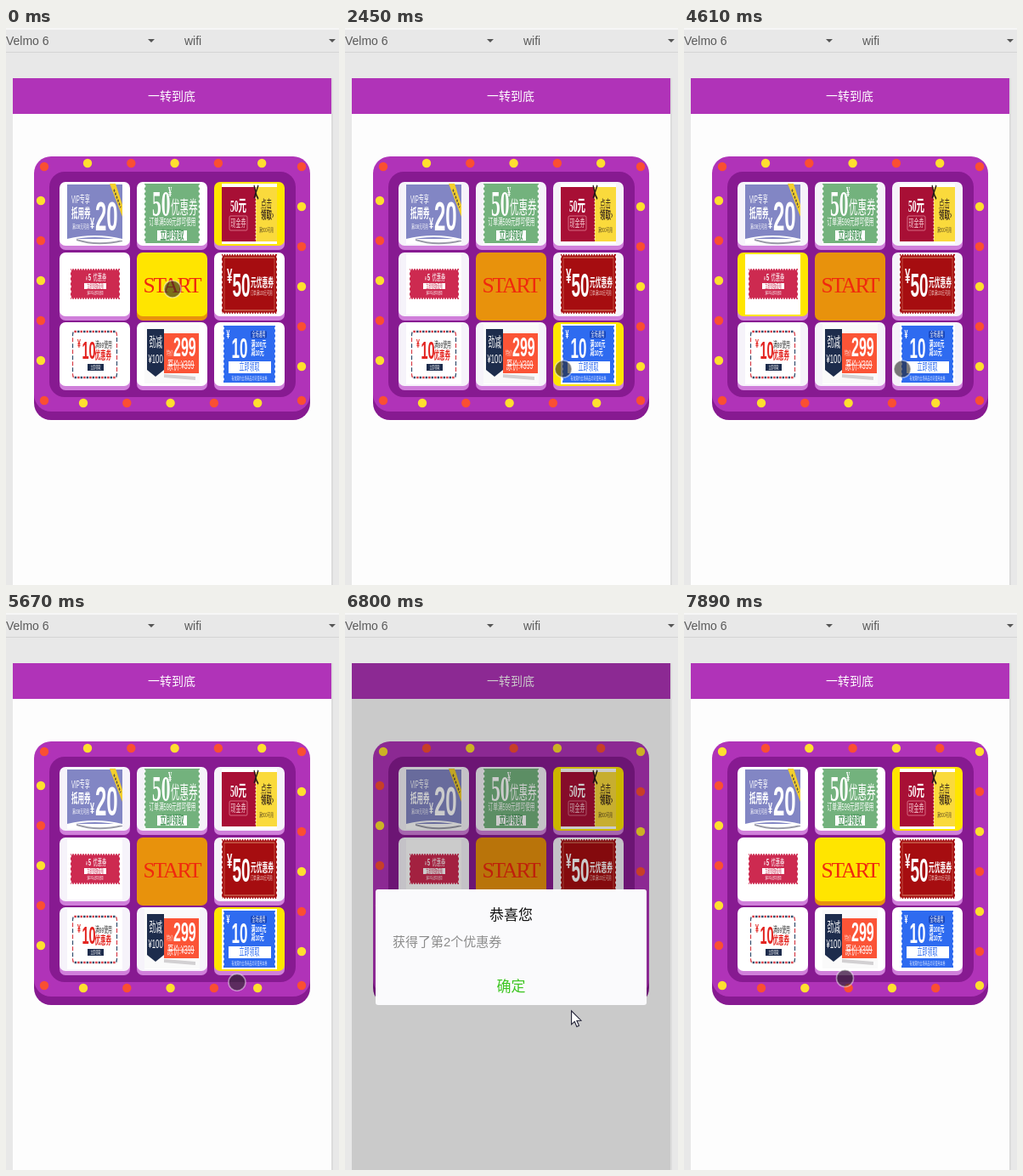
These frames come from a looping animation (392x655 px, 8 s). An HTML page:

```html
<!DOCTYPE html>
<html lang="zh-CN">
<head>
<meta charset="utf-8">
<title>一转到底</title>
<style>
html, body { margin: 0; width: 100%; height: 100%; overflow: hidden; background: #e8e8e8; }
svg { display: block; width: 100vw; height: 100vh; }
text { font-family: "Liberation Sans", "Noto Sans CJK SC", "Noto Sans CJK", sans-serif; white-space: pre; }
.serif { font-family: "Liberation Serif", "Noto Sans CJK SC", serif; }
</style>
</head>
<body>
<svg id="stage" viewBox="0 0 392 655"></svg>
<script>
const LOOP = 8000;
const START_AT = 97, TICK = 195.5, TICKS = 34;
const LAMP_AT = 65, LAMP_STEP = 475;
const OPEN_AT = START_AT + TICK * TICKS, CLOSE_AT = 7600;
const PURPLE = '#b033b8', DEEP = '#871a91', YELLOW = '#ffe500', ORANGE = '#e8920c';

const rect = (x, y, w, h, fill, r = 0, more = '') =>
  `<rect x="${x}" y="${y}" width="${w}" height="${h}" rx="${r}" fill="${fill}" ${more}/>`;
const text = (x, y, size, str, fill, more = '') =>
  `<text x="${x}" y="${y}" font-size="${size}" fill="${fill}" ${more}>${str}</text>`;
const poly = (points, fill, more = '') => `<polygon points="${points}" fill="${fill}" ${more}/>`;
const line = (d, stroke, width, more = '') =>
  `<path d="${d}" fill="none" stroke="${stroke}" stroke-width="${width}" ${more}/>`;
const bold = 'font-weight="700"', mid = 'text-anchor="middle"';
const serif = 'class="serif"';
const notches = d => line(d, '#fff', 3.5, 'stroke-linecap="round" stroke-dasharray="0 6"');

// Coupon pictures, 130 x 71 units, shown at half width like the squeezed images they are.
const coupons = [
  rect(0, 1, 130, 64, '#8286c4') +
    line('M22 66Q70 74 130 67', '#9a9aa8', 2) +
    line('M0 66Q65 58 130 66', '#fff', 2) +
    poly('100,0 114,0 130,25 130,39', '#f3cf2c') +
    line('M110 7L126 28', '#5d5440', 3, 'stroke-dasharray="3 2"') +
    text(10, 23, 12, 'VIP专享', '#fff') +
    text(10, 40, 15, '抵用券', '#fff', bold) +
    text(12, 53, 7, '满198元可用', '#fff') +
    text(54, 53, 18, '¥', '#fff', bold) +
    text(66, 55, 48, '20', '#fff', bold),
  rect(0, 0, 130, 70, '#73b27d') + notches('M1 3V70M129 3V70') +
    text(18, 38, 43, '50', '#fff', serif + bold) +
    text(56, 15, 17, '¥', '#fff', serif + bold) +
    text(62, 35, 21, '优惠券', '#fff') +
    text(11, 49, 11.4, '订单满599元即可使用', '#fff') +
    rect(30, 55, 70, 12, '#fff') + text(65, 65.5, 14, '立即领取', '#4f9b60', mid + bold),
  rect(0, 4, 80, 64, '#a80f35') + rect(80, 4, 50, 64, '#fada3c') +
    line('M80 4V68', '#fff', 1, 'stroke-dasharray="2 2"') +
    line('M76 2L82 14M86 2L78 14M76 17L80 12L86 18', '#221a1a', 2.5) +
    text(20, 33, 19, '50元', '#fff', serif + bold) +
    rect(18, 38, 42, 17, 'none', 2, 'stroke="#e58a9c"') +
    text(39, 51, 12, '现金券', '#f6c9d0', mid) +
    text(92, 28, 13, '点击', '#3b2a1c') +
    text(92, 41, 13, '领取›', '#3b2a1c', bold) +
    text(88, 57, 7.2, '满500可用', '#5d4a22'),
  rect(8, 17, 116, 36, '#cd2a50') + notches('M8 20V53M124 20V53M11 17H122M11 53H122') +
    text(44, 31, 7, '¥', '#fff') + text(50, 31, 11, '5', '#fff', bold) +
    text(61, 31, 10.5, '优惠券', '#fff') +
    rect(40, 34, 52, 7, '#fff') + text(66, 40, 6.5, '立即领取使用', '#cd2a50', mid) +
    text(66, 47, 5, '满100元即可使用', '#fff', mid),
  rect(0, 0, 130, 70, '#a60d10') + notches('M0 3V70M130 3V70M4 0H128M4 70H128') +
    rect(6, 4, 118, 62, 'none', 0, 'stroke="#d98b6a" stroke-width="1"') +
    text(12, 34, 23, '¥', '#fff', bold) +
    text(25, 50, 38, '50', '#fff', bold) +
    text(68, 38, 13.5, '元优惠券', '#fff', bold) +
    text(68, 48, 6.7, '订单满100元可用', '#f4d7d0'),
  rect(13, 9, 104, 54, '#fff', 4, 'stroke="#d8404a" stroke-width="2.5" stroke-dasharray="5 9"') +
    rect(13, 9, 104, 54, 'none', 4, 'stroke="#34506e" stroke-width="2.5" stroke-dasharray="5 9" stroke-dashoffset="-7"') +
    text(24, 28, 14, '¥', '#e32420', bold) +
    text(35, 41, 29, '10', '#e32420', bold) +
    text(66, 28, 9.7, '满99使用', '#333') +
    text(65, 41, 13, '优惠券', '#e32420', bold) +
    rect(48, 47, 38, 8, '#1d2c4c') + text(67, 53.5, 6, '立即领取', '#fff', mid),
  rect(0, 1, 130, 69, '#fafafa') +
    line('M46 61L120 64', '#d2d0d2', 4) +
    rect(46, 11, 82, 47, '#fb5436') +
    poly('6,6 46,6 46,54 26,62 6,54', '#1d2c4c') +
    text(11, 27, 15.5, '劲减', '#fff') +
    text(9, 46, 15.5, '¥100', '#fff') +
    text(52, 37, 8, '特价', '#ffd9cf') +
    text(68, 38, 32, '299', '#fff', bold) +
    text(54, 53, 14, '原价:¥399', '#fff') + line('M54 48.5H118', '#fff', 1),
  rect(4, 2, 122, 67, '#2e6bf0') + notches('M4 5V68M126 5V68') +
    text(11, 17, 14, '¥', '#fff', bold) +
    text(23, 40, 34, '10', '#fff', bold) +
    rect(68, 8, 38, 9, '#1746bd', 3) + text(87, 15.5, 8, '全场通用', '#fff', mid) +
    text(69, 27, 9.8, '满100元', '#fff', bold) +
    text(69, 37, 9.8, '减10元', '#fff', bold) +
    rect(16, 44, 100, 14, '#fff') + text(65, 55.5, 12, '立即领取', '#2e6bf0', mid) +
    text(65, 66, 6, '有效期内全场商品均可使用本券', '#dbe6ff', mid)
];
// Pictures above are listed row by row; the light runs clockwise.
const ring = [0, 1, 2, 4, 7, 6, 5, 3];

const cell = (x, y, art) =>
  rect(x, y + 5, 83, 75, '#d07fda', 7) + rect(x, y, 83, 75, '#fff', 7, 'class="face"') +
  `<g transform="translate(${x + 9} ${y + 2}) scale(.5 1)">${rect(0, 0, 130, 71, '#fff') + art}</g>`;

function cells() {
  let out = '';
  coupons.forEach((art, i) => {
    const slot = i < 4 ? i : i + 1;
    out += cell(63 + 91 * (slot % 3), [181, 264, 346][Math.floor(slot / 3)], art);
  });
  return out;
}

function lamps() {
  const spots = [];
  const add = (x, y, odd) => spots.push([x, y, odd]);
  for (const x of [45, 348]) for (const y of [163, 438]) add(x, y, 0);
  for (let i = 0; i < 5; i++) {
    const odd = (i + 1) % 2;
    add(96 + i * 51.3, 159, odd);
    add(91 + i * 51.3, 441, odd);
    add(41, 203 + i * 47, odd);
    add(348, 210 + i * 47, odd);
  }
  return spots.map(([x, y, odd]) => `<circle class="lamp" data-odd="${odd}" cx="${x}" cy="${y}" r="5.2"/>`).join('');
}

const stage = document.getElementById('stage');
stage.innerHTML =
  rect(0, 0, 392, 655, '#e8e8e8') + rect(0, 0, 392, 2, '#f6f6f6') + rect(0, 28, 392, 1, '#d4d4d4') +
  text(0, 20, 14, 'Velmo 6', '#5a5a5a') + text(210, 20, 14, 'wifi', '#5a5a5a') +
  poly('167,13 175,13 171,17', '#555') + poly('380,13 388,13 384,17', '#555') +
  rect(383, 59, 2, 596, '#dcdcdc') + rect(8, 59, 375, 596, '#fdfdfd') + rect(8, 59, 375, 42, PURPLE) +
  text(195, 85, 14, '一转到底', '#fff', mid) +
  rect(33, 161, 325, 300, DEEP, 20) + rect(33, 151, 325, 300, PURPLE, 20) +
  rect(51, 169, 290, 265, DEEP, 18) + lamps() + cells() +
  rect(154, 269, 83, 75, ORANGE, 7) + rect(154, 264, 83, 75, YELLOW, 7, 'id="go"') +
  text(195, 311, 25.5, 'START', '#f0280e', mid + ' letter-spacing="-2" ' + serif) +
  `<g id="modal">${rect(8, 59, 375, 596, '#000', 0, 'opacity=".205"') +
    rect(36, 325, 319, 136, '#fafafc', 3) +
    text(195.5, 361, 17, '恭喜您', '#111', mid) +
    text(56, 392, 15, '获得了第2个优惠券', '#8c8c8c') +
    text(195.5, 445, 17, '确定', '#3cc51f', mid)}</g>` +
  '<circle id="touch" r="10" fill="#282828" fill-opacity=".62" stroke="#fff" stroke-opacity=".45" stroke-width="1.6"/>' +
  poly('0,0 0,16 3.7,12.6 6.3,18.6 8.9,17.5 6.3,11.6 11.3,11.4', '#fff', 'id="arrow" stroke="#222236" stroke-width="1.1"');

const $ = id => document.getElementById(id);
const go = $('go'), modal = $('modal'), touch = $('touch'), arrow = $('arrow');
const faces = [...stage.querySelectorAll('.face')];
const lampEls = [...stage.querySelectorAll('.lamp')];

const path = [
  [0, 196, 307], [430, 196, 307], [1190, 214, 363], [1640, 257, 401], [5300, 257, 401],
  [5670, 272, 434], [5830, 267, 467], [7000, 266.5, 468], [7400, 190, 434], [7800, 189.5, 429.5], [LOOP, 189.5, 429.5]
];
const clamp = v => Math.max(0, Math.min(1, v));

function pointer(t) {
  const i = Math.max(1, path.findIndex(p => p[0] > t));
  const a = path[i - 1], b = path[i];
  const k = (t - a[0]) / (b[0] - a[0]);
  return [a[1] + (b[1] - a[1]) * k, a[2] + (b[2] - a[2]) * k];
}

function draw(t) {
  const running = t >= START_AT && t < CLOSE_AT;
  const tick = Math.min(TICKS, Math.floor((t - START_AT) / TICK));
  const lit = ring[tick < 1 ? TICKS % 8 : tick % 8];
  faces.forEach((f, i) => f.setAttribute('fill', i === lit ? YELLOW : running ? '#f6f3fa' : '#fff'));
  go.setAttribute('fill', running ? ORANGE : YELLOW);

  const swap = Math.floor((t - LAMP_AT) / LAMP_STEP) + 1;
  lampEls.forEach(l => l.setAttribute('fill', (swap + +l.dataset.odd) % 2 ? '#ffdf2f' : '#fa4f32'));

  const shown = clamp((t - OPEN_AT) / 45) * (1 - clamp((t - CLOSE_AT) / 90));
  modal.setAttribute('opacity', shown);
  const pos = `translate(${pointer(t)})`;
  touch.setAttribute('transform', pos);
  arrow.setAttribute('transform', pos);
  touch.style.display = shown ? 'none' : '';
  arrow.style.display = shown ? '' : 'none';
}

const begin = performance.now();
function frame() {
  draw((performance.now() - begin) % LOOP);
  requestAnimationFrame(frame);
}
frame();
</script>
</body>
</html>
```
